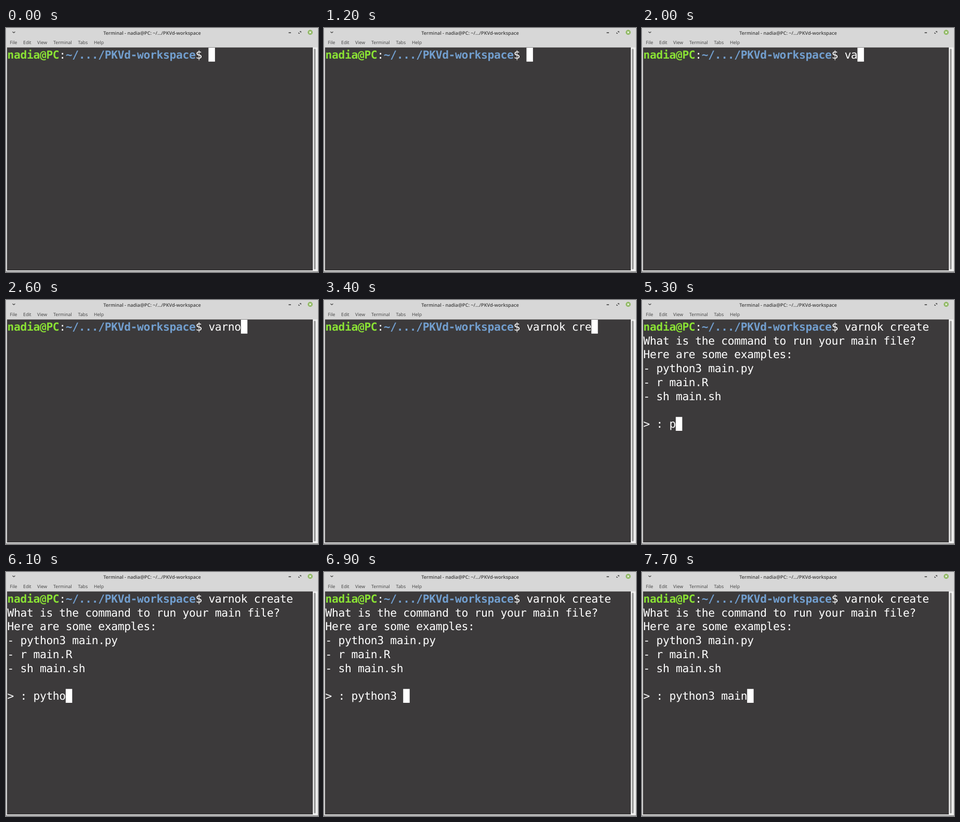
Write an HTML page with a canvas that moves like this. It is 600 px wide and 470 px high and loops after 8 s.

```html
<!DOCTYPE html>
<html lang="en">
<head>
<meta charset="utf-8">
<title>Terminal</title>
<style>
  html, body { margin: 0; width: 100%; height: 100%; overflow: hidden; background: #d7d7d7; }
  canvas { display: block; width: 600px; height: 470px; }
</style>
</head>
<body>
<canvas id="stage" width="600" height="470"></canvas>
<script>
const ctx = document.getElementById('stage').getContext('2d');
ctx.textRendering = 'geometricPrecision';

const LOOP = 8000;
const CELL_W = 12.48, CELL_H = 26.75, LEFT = 2.5, TOP = 38, BASE = 20.8;
const MONO = '21.3px "DejaVu Sans Mono", monospace';
const SANS = '"Open Sans", "Noto Sans", sans-serif';
const COLORS = { bg: '#3c3a3b', text: '#ffffff', user: '#8ae234', path: '#729fcf', ink: '#3f3f3f' };

const USER = 'nadia@PC', PATH = '~/.../PKVd-workspace';
const PROMPT_LEN = USER.length + PATH.length + 3;
const COMMAND = 'varnok create', ANSWER = 'python3 main';
const OUTPUT = [
  'What is the command to run your main file?',
  'Here are some examples:',
  '- python3 main.py',
  '- r main.R',
  '- sh main.sh',
  '',
  '> : '
];

// Time at which each character is typed
const COMMAND_KEYS = [1600, 2000, 2100, 2200, 2600, 2700, 2800, 3100, 3400, 3400, 3600, 3800, 3900];
const ANSWER_KEYS = [5300, 5600, 5700, 6000, 6100, 6200, 6500, 6900, 7200, 7400, 7500, 7600];
const ENTER = 4600, REPLY = 4700;

const typed = (text, keys, t) => text.slice(0, keys.filter(k => k <= t).length);

function rect(x, y, w, h, color) {
  ctx.fillStyle = color;
  ctx.fillRect(x, y, w, h);
}

function line(points, color, width) {
  ctx.beginPath();
  points.forEach(([x, y], i) => i ? ctx.lineTo(x, y) : ctx.moveTo(x, y));
  ctx.strokeStyle = color;
  ctx.lineWidth = width;
  ctx.stroke();
}

function print(text, col, row, color = COLORS.text, bold = false) {
  ctx.font = (bold ? 'bold ' : '') + MONO;
  ctx.fillStyle = color;
  [...text].forEach((c, i) => {
    ctx.fillText(c, LEFT + (col + i) * CELL_W, TOP + row * CELL_H + BASE);
  });
}

function cursor(col, row) {
  rect(LEFT + col * CELL_W, TOP + row * CELL_H, CELL_W, CELL_H, COLORS.text);
}

function drawTitleBar() {
  ctx.font = '600 9.1px ' + SANS;
  ctx.fillStyle = COLORS.ink;
  ctx.textAlign = 'center';
  ctx.fillText(`Terminal - ${USER}: ${PATH}`, 281, 12.6);
  ctx.textAlign = 'left';

  line([[12.5, 7.2], [15, 9.3], [17.5, 7.2]], COLORS.ink, 1.2);
  rect(543.5, 8.3, 4.5, 1.6, COLORS.ink);
  line([[564.8, 6.7], [567, 6.7], [567, 8.9]], COLORS.ink, 1.2);
  line([[563, 8.5], [563, 10.5], [565, 10.5]], COLORS.ink, 1.2);

  ctx.beginPath();
  ctx.arc(585, 8.4, 4.8, 0, Math.PI * 2);
  ctx.fillStyle = '#8fb863';
  ctx.fill();
  line([[583.2, 6.6], [586.8, 10.2]], '#ffffff', 1.1);
  line([[586.8, 6.6], [583.2, 10.2]], '#ffffff', 1.1);
}

function drawMenu() {
  ctx.font = '8.8px ' + SANS;
  ctx.fillStyle = COLORS.ink;
  const items = { File: 7.5, Edit: 33, View: 60, Terminal: 91, Tabs: 138.5, Help: 169 };
  for (const [label, x] of Object.entries(items)) ctx.fillText(label, x, 30.8);
}

function drawWindow() {
  rect(0, 0, 600, 470, '#d7d7d7');
  drawTitleBar();
  drawMenu();
  rect(2, 37.5, 588, 429.5, COLORS.bg);
  rect(590, 37.5, 9, 431, '#f0f0f0');
  rect(1, 467, 598, 1.5, '#e6e6e6');
  ctx.fillStyle = '#9c9c9c';
  ctx.beginPath();
  ctx.roundRect(592, 40, 3.6, 425, 1.8);
  ctx.fill();
  rect(0, 469, 600, 1, '#777777');
}

function drawTerminal(t) {
  print(USER, 0, 0, COLORS.user, true);
  print(':', USER.length, 0);
  print(PATH, USER.length + 1, 0, COLORS.path, true);
  print('$', PROMPT_LEN - 2, 0);

  const command = typed(COMMAND, COMMAND_KEYS, t);
  print(command, PROMPT_LEN, 0);
  if (t < ENTER) return cursor(PROMPT_LEN + command.length, 0);
  if (t < REPLY) return cursor(0, 1);

  OUTPUT.forEach((text, i) => print(text, 0, i + 1));
  const answer = typed(ANSWER, ANSWER_KEYS, t), col = OUTPUT.at(-1).length;
  print(answer, col, OUTPUT.length);
  cursor(col + answer.length, OUTPUT.length);
}

function frame() {
  drawWindow();
  drawTerminal(performance.now() % LOOP);
  requestAnimationFrame(frame);
}

frame();
</script>
</body>
</html>
```
